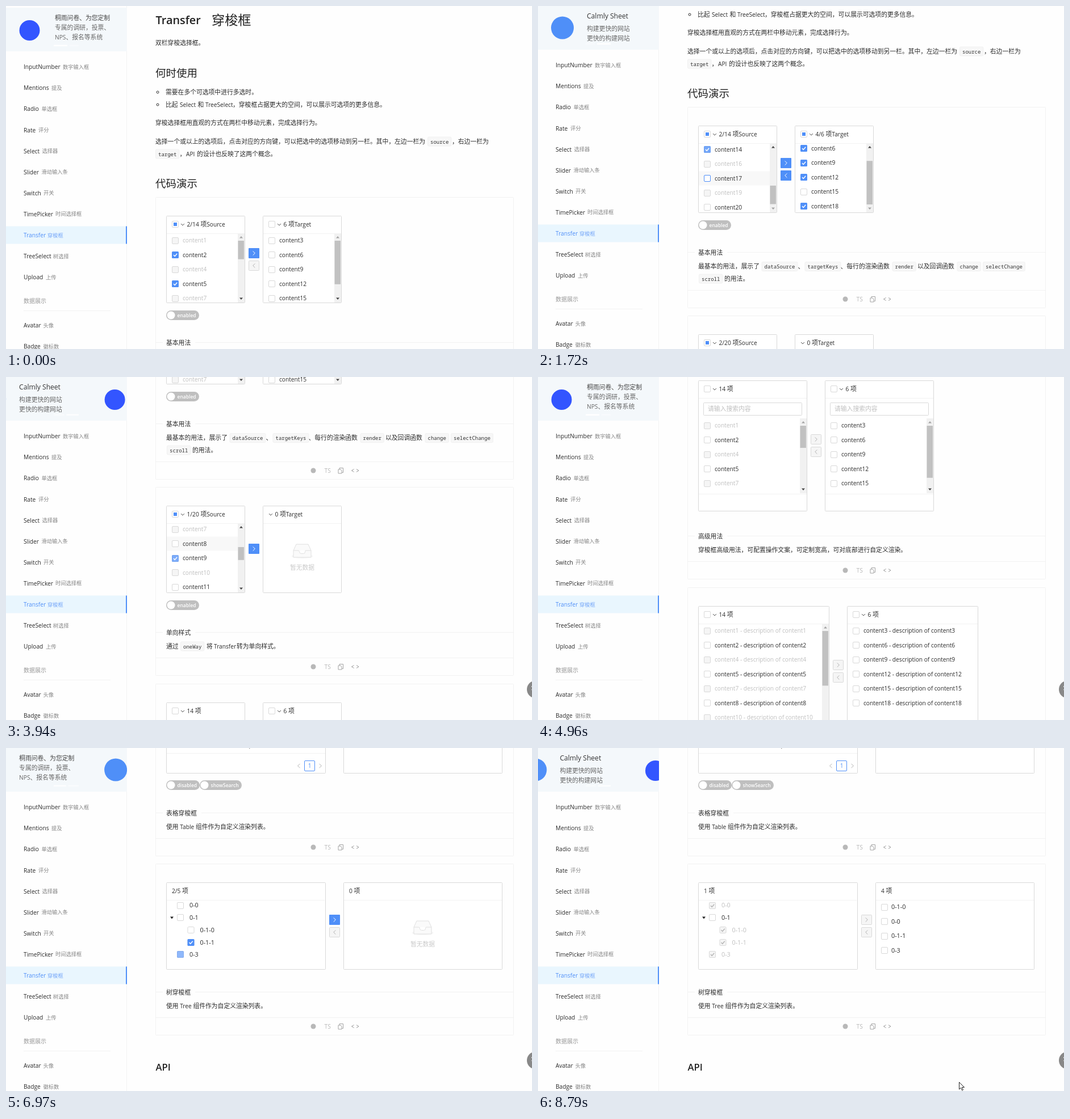
Write an HTML page that moves like this. It is 926 px wide and 605 px high and loops after 8890 ms.

```html
<!DOCTYPE html>
<html lang="zh-CN">
<head>
<meta charset="utf-8">
<title>Transfer</title>
<style>
html, body { margin: 0; width: 100%; height: 100%; overflow: hidden; background: #fefefe; }
svg { display: block; }
text { font-family: "Noto Sans CJK SC", "Noto Sans CJK", sans-serif; white-space: pre; }
.latin { font-family: "Open Sans", sans-serif; }
.code { font-family: "Noto Sans Mono", monospace; }
</style>
</head>
<body>
<svg id="stage" width="926" height="605" viewBox="0 0 926 605" xml:space="preserve"></svg>
<script>
const LOOP = 8890, STEP = 101;
const BLUE = '#4f8ff8', INK = '#2b2b2b', GREY = '#bfbfbf', EDGE = '#d9d9d9', LINE = '#f2f2f2';
const stage = document.getElementById('stage');
let t = 0;

// timing
const clamp = v => Math.max(0, Math.min(1, v));
const on = (from, to = LOOP, d = 120) => t < from || t >= to ? 0 : clamp((t - from) / d);
const held = to => t < to ? 1 : 0;
const within = (a, b) => t >= a && t < b;
function track(keys) {
  let i = keys.findIndex(k => k[0] > t);
  if (i === 0) return keys[0][1];
  if (i < 0) return keys[keys.length - 1][1];
  const [a, u] = keys[i - 1], [b, v] = keys[i], k = (t - a) / (b - a);
  return u + (v - u) * k * k * (3 - 2 * k);
}
// cubic-bezier(.25, .1, .25, 1)
function ease(x) {
  x = clamp(x);
  let lo = 0, hi = 1;
  for (let i = 0; i < 20; i++) {
    const s = (lo + hi) / 2;
    if (.75 * s * (1 - s) + s ** 3 < x) lo = s; else hi = s;
  }
  return .3 * lo * (1 - lo) ** 2 + 3 * lo * lo * (1 - lo) + lo ** 3;
}

// drawing
const rect = (x, y, w, h, fill, more = '') => `<rect x="${x}" y="${y}" width="${w}" height="${h}" fill="${fill}" ${more}/>`;
const frame = (x, y, w, h, color, fill = 'none', r = 1) => rect(x + .5, y + .5, w - 1, h - 1, fill, `stroke="${color}" rx="${r}"`);
const path = (d, color, w = 1, fill = 'none') => `<path d="${d}" stroke="${color}" stroke-width="${w}" fill="${fill}"/>`;
const circle = (x, y, r, fill, more = '') => `<circle cx="${x}" cy="${y}" r="${r}" fill="${fill}" ${more}/>`;
const hline = (x, y, w, c = LINE) => rect(x, y, w, 1, c);
const move = (x, y, s) => `<g transform="translate(${x},${y})">${s}</g>`;
const clip = (x, y, w, h, s) => `<svg x="${x}" y="${y}" width="${w}" height="${h}">${s}</svg>`;

function text(x, y, s, c = INK, z = 10.8, w = 400) {
  const runs = s.replace(/[^\u2e80-\uffff]+/g, m => `<tspan class="latin" font-size="${z * .945}">${m}</tspan>`);
  return `<text x="${x}" y="${y + z * .35}" fill="${c}" font-size="${z}" font-weight="${w}">${runs}</text>`;
}
const texts = (y, ...runs) => runs.map(([x, s]) => text(x, y, s)).join('');
function code(x, y, s) {
  return frame(x, y - 8.5, 5.4 * s.length + 10, 17, '#f1f1f1', '#f7f7f7', 2) +
    `<text class="code" x="${x + 5}" y="${y + 3.5}" font-size="9" fill="#333">${s}</text>`;
}
const codes = (y, ...runs) => runs.map(([x, s]) => code(x, y, s)).join('');
const tick = c => path('M-3 0l2.2 2.4 4-4.7', c, 1.5);

function box(x, y, amt = 0, o = {}) {
  let s = frame(-6, -6, 12, 12, o.hot ? BLUE : EDGE, o.off ? '#f5f5f5' : '#fff', 1.5);
  if (amt && o.off) s += tick('#b5b5b5');
  else if (amt) s += rect(-6, -6, 12, 12, BLUE, `rx="1.5" opacity="${.35 + .65 * amt}"`) + (amt > .5 ? tick('#fff') : '');
  if (o.part) s += rect(-3, -3, 6, 6, BLUE);
  return move(x, Math.round(y), s);
}
function button(x, y, dir, amt) {
  const d = `M${-1.8 * dir} -3.6l${3.6 * dir} 3.6 ${-3.6 * dir} 3.6`;
  return move(x, y, frame(-9.5, -9, 19, 18, EDGE, '#f5f5f5') +
    (amt ? rect(-9.5, -9, 19, 18, BLUE, `rx="1" opacity="${.45 + .55 * amt}"`) : '') +
    path(d, amt ? '#fff' : '#b0b0b0'));
}
const buttons = (x, y, right, left) => button(x, y, 1, right) + button(x, y + 22, -1, left);
const toggle = (x, y, w, s) => rect(x, y - 8.5, w, 17, GREY, 'rx="8.5"') + circle(x + 8.5, y, 7, '#fff') +
  text(x + 19.5, y + .5, s, '#fff', 9, 600);
const pager = (x, y) => path(`M${x - 17} ${y - 3.5}l-4 3.5 4 3.5M${x + 17} ${y - 3.5}l4 3.5-4 3.5`, '#b5b5b5') +
  frame(x - 9.5, y - 9.5, 19, 19, BLUE, '#fff', 1.5) + text(x - 2.8, y, '1', BLUE);
const empty = (x, y) => move(x, y,
  `<ellipse cy="9" rx="19" ry="4" fill="#f6f6f6"/>` +
  path('M-15.5-1L-10.5-12H10.5L15.5-1V11H-15.5ZM-15.5-1H-7Q-5 -1-5 1.5T-2 4.5H2Q5 4.5 5 1.5T7-1H15.5', '#e0e0e0', 1, '#fafafa') +
  text(-21.6, 29.5, '暂无数据', '#cacaca'));

// list column of a transfer
function list(x, y, o) {
  const { rows, w = 139, h = 154, title = '', pad = 0, foot = 0, scroll = 0, pick = {}, boxed = true, label = k => 'content' + k } = o;
  const n = rows.length, count = rows.filter(k => pick[k]).length, cx = boxed ? 29 : 14;
  let s = frame(0, 0, w, h, EDGE, '#fff') + hline(1, 31, w - 2);
  if (boxed) s += box(16, 15, 0, { part: count });
  s += path(`M${cx - 3} 14l3 3 3-3`, '#555') + text(cx + 7.5, 15.5, (count ? count + '/' : '') + n + ' 项' + title);
  if (pad) s += frame(9, 39, w - 18, 23, EDGE, '#fff') + text(17, 50.5, '请输入搜索内容', GREY);
  const view = h - 32 - pad - foot, all = n * 25.5 - 2, bar = all > view;
  const body = rows.map((k, i) => {
    const ry = 12.5 + 25.5 * i - scroll, off = k % 3 === 1;
    if (ry < -14 || ry > view + 14) return '';
    return (o.hover === k ? rect(0, ry - 12.5, w - 14, 25, '#f8f8f8') : '') +
      (boxed ? box(15, ry, pick[k], { off, hot: o.hot === k }) : path(`M${w - 18} ${ry - 3}l6 6m0-6l-6 6`, '#999')) +
      text(boxed ? 28 : 10, ry, label(k), off ? GREY : INK);
  }).join('');
  s += clip(1, 31 + pad, w - 2, view, body + (bar ? move(w - 14, 0, scrollbar(view, all, scroll)) : ''));
  if (!n) s += empty(w / 2, 80);
  if (foot) s += hline(1, h - foot, w - 2);
  return move(x, y, s);
}
function scrollbar(view, all, pos) {
  const room = view - 27, len = room * view / all, k = pos / (all - view);
  return rect(0, 0, 13, view, '#f1f1f1') + rect(.5, 13 + (room - len) * k, 10.5, len, '#c1c1c1') +
    path('M3 8.5l3-3.5 3 3.5z', 'none', 0, pos > 0 ? '#444' : '#a3a3a3') +
    path(`M3 ${view - 8.5}l3 3.5 3-3.5z`, 'none', 0, k < .99 ? '#444' : '#a3a3a3');
}

// table column of a transfer
function table(x, y, w, rows, pick, hover, wide) {
  const count = rows.filter(k => pick[k]).length;
  let s = frame(0, 0, w, 308, EDGE, '#fff') + text(10, 15.5, (count ? count + '/' : '') + rows.length + ' 项') +
    hline(1, 31, w - 2) + rect(1, 32, w - 2, 29, '#fafafa') + hline(1, 61, w - 2) +
    box(16, 45, 0, { part: count }) + text(38, 46, 'Name', INK, 10.8, 600);
  if (wide) s += text(117, 46, 'Description', INK, 10.8, 600) + rect(110, 37, 1, 18, LINE);
  rows.forEach((k, i) => {
    const ry = Math.round(76.5 + 30.15 * i);
    const bg = pick[k] ? '#ebf7fe' : hover === k ? '#fafafa' : '';
    if (bg) s += rect(1, ry - 15, w - 2, 30, bg);
    s += hline(1, ry + 15, w - 2) + box(16, ry - 1, pick[k], { off: k % 4 === 1 }) + text(38, ry, 'content' + k);
    if (wide) s += text(117, ry, 'description of content' + k);
  });
  return move(x, y, s + pager(w - 28.5, Math.round(83 + 30.15 * rows.length) + .5));
}

// demo card; its description lines are drawn from the first text row
function demo(top, h, title, body, desc, lines = 1) {
  const up = 21.5 * (lines - 1), ty = h - 76 - up, end = 290 + title.length * 10.8, line = Math.floor(ty - 1);
  return move(0, top, frame(263, 0, 631, h, LINE, '#fefefe') + hline(263, line, 13) + hline(end, line, 893 - end) +
    text(282, ty, title) + move(0, h - 52 - up, desc) + hline(263, h - 32, 630) +
    circle(541, h - 16, 4.5, '#b8b8b8') + text(560.5, h - 15.5, 'TS', '#b8b8b8') +
    path(`M587 ${h - 18}v-2.5h6.5v8h-2M585 ${h - 18}h4l2 2v5h-6z`, '#a3a3a3') +
    path(`M612.5 ${h - 18.5}l-4 2.5 4 2.5M617 ${h - 18.5}l4 2.5-4 2.5`, '#999') + body);
}

const range = n => Array.from({ length: n }, (_, i) => i + 1);
const all = range(20), third = all.filter(k => k % 3 === 0), others = all.filter(k => k % 3);

function basic() {
  const sent = t >= 2000, back = t >= 2200, moved = [5, 14, 17], returned = [6, 9, 12, 18];
  const target = [...(sent ? moved : []), ...third].filter(k => !back || !returned.includes(k));
  const source = all.filter(k => !target.includes(k));
  const left = { 2: held(700), 5: held(2000), 14: on(1630, 2000), 17: on(1800, 2000) };
  const right = { 6: on(900, 2200), 9: on(1020, 2200), 12: on(1150, 2200), 18: on(1400, 2200), 5: on(2480) };
  const hoverL = within(1650, 1850) ? 17 : 0, hoverR = within(2500, 2750) ? 14 : 0;
  return list(282, 33, { rows: source, title: 'Source', pick: left, hover: hoverL, hot: hoverL,
      scroll: sent ? (back ? 0 : 155) : track([[1400, 0], [1600, 231]]) }) +
    list(452, 33, { rows: target, title: 'Target', pick: right, hover: hoverR, hot: hoverR,
      scroll: sent ? 0 : track([[1180, 0], [1360, 29]]) }) +
    buttons(436.5, 99, held(2000), on(900, 2200, 250) || on(2480, LOOP, 250)) + toggle(282, 208.5, 58, 'enabled');
}
function oneWay() {
  const sent = t >= 4250, pick = { 2: held(3500), 5: held(3860), 9: on(3860, 4250) };
  return list(282, 33, { rows: sent ? all.filter(k => k !== 9) : all, title: 'Source', pick,
      hover: within(3850, 4050) ? 8 : 0, scroll: track([[3540, 0], [3760, 155]]) }) +
    list(452, 33, { rows: sent ? [9] : [], title: 'Target', boxed: false }) +
    button(436.5, 109, 1, held(4250)) + toggle(282, 208.5, 58, 'enabled');
}
const plain = (w, h, o) => list(282, 33, { rows: others, w, h, ...o }) +
  list(282 + w + 31, 33, { rows: third, w, h, ...o }) + buttons(282 + w + 15.5, 22 + Math.floor(h / 2), 0, 0);
function tables() {
  const sent = t >= 6050, back = t >= 6250;
  const target = [...(sent ? [2] : []), ...(back ? [] : [3]), 6, 9];
  const source = range(10).filter(k => !target.includes(k));
  return table(282, 33, 281, source, { 2: on(5830, 6050) }, within(5850, 6050) ? 4 : 0, true) +
    table(594, 33, 280, target, { 3: on(5650, 6250) }, 0, false) +
    buttons(578.5, 176, on(5830, 6050, 250), on(5650, 6250, 250)) +
    toggle(282, 361.5, 59, 'disabled') + toggle(341, 361.5, 74, 'showSearch');
}
function tree() {
  const nodes = [['0-0', 0, 7700, 8000], ['0-1', 0], ['0-1-0', 1, 7500, 8000], ['0-1-1', 1, 6790, 7170], ['0-3', 0, 6910, 7170]];
  const sent = [...(t >= 8000 ? ['0-1-0', '0-0'] : []), ...(t >= 7170 ? ['0-1-1', '0-3'] : [])];
  const checked = n => n[2] ? on(n[2], n[3]) : 0;
  const count = nodes.filter(checked).length;
  const head = (n, c) => text(10, 15.5, (c ? c + '/' : '') + n + ' 项') + hline(1, 31, 278);
  const left = nodes.map((node, i) => {
    const [name, depth] = node, y = 40.5 + 21.7 * i, x = 25 + 18.5 * depth, off = sent.includes(name);
    return box(x, y, off ? 1 : checked(node), { off }) + text(x + 16, y, name, off ? GREY : INK, 11.4);
  }).join('') + path('M7 60.5h6l-3 4z', 'none', 0, '#222');
  const right = sent.map((name, i) => box(16, 43.5 + 25.5 * i) + text(28, 43.5 + 25.5 * i, name, INK, 11.4)).join('');
  return move(282, 33, frame(0, 0, 281, 154, EDGE, '#fff') + head(5 - sent.length, count) + left) +
    move(594, 33, frame(0, 0, 280, 154, EDGE, '#fff') + head(sent.length, 0) + (right || empty(139.5, 80))) +
    buttons(578.5, 99, on(6750, 7170, 200) || on(7500, 8000, 250), 0);
}

function page() {
  return text(263.5, 25, 'Transfer', '#222', 21, 600) + text(362, 25, '穿梭框', '#222', 23.2) +
    text(263, 65, '双栏穿梭选择框。') + text(263, 119, '何时使用', '#222', 18.5) +
    circle(267, 152, 2, 'none', 'stroke="#333"') + circle(267, 174, 2, 'none', 'stroke="#333"') +
    text(281, 152, '需要在多个可选项中进行多选时。') +
    texts(174, [281, '比起'], [306, 'Select'], [337.5, '和'], [351, 'TreeSelect'], [399, '，穿梭框占据更大的空间，可以展示可选项的更多信息。']) +
    text(263, 206, '穿梭选择框用直观的方式在两栏中移动元素，完成选择行为。') +
    texts(239, [263, '选择一个或以上的选项后，点击对应的方向键，可以把选中的选项移动到另一栏。其中，左边一栏为'], [785, '，右边一栏为']) +
    code(742, 239, 'source') + code(263, 261, 'target') +
    texts(261, [305.5, '，'], [317, 'API'], [336, '的设计也反映了这两个概念。']) +
    text(263, 314, '代码演示', '#222', 18.5) +
    demo(337, 355, '基本用法', basic(),
      texts(0, [282, '最基本的用法，展示了'], [457.5, '、'], [532.5, '、每行的渲染函数'], [668, '以及回调函数']) +
      codes(0, [393.5, 'dataSource'], [469.5, 'targetKeys'], [623.5, 'render'], [737.5, 'change'], [783, 'selectChange']) +
      code(283, 21.5, 'scroll') + text(328, 21.5, '的用法。'), 2) +
    demo(705, 333, '单向样式', oneWay(),
      texts(0, [282, '通过'], [353, '将'], [366, 'Transfer'], [406, '转为单向样式。']) + code(307, 0, 'oneWay')) +
    demo(1052, 307, '带搜索框', plain(139, 154, { pad: 36 }), text(282, 0, '带搜索框的穿梭框，可以自定义搜索函数。')) +
    demo(1373, 384, '高级用法', plain(192, 231, { pad: 36, foot: 31 }), text(282, 0, '穿梭框高级用法，可配置操作文案，可定制宽高，可对底部进行自定义渲染。')) +
    demo(1771, 384, '自定义渲染行数据', plain(231, 231, { label: k => `content${k} - description of content${k}` }), text(282, 0, '自定义渲染每一个 Transfer Item，可用于渲染复杂数据。')) +
    demo(2169, 333, '分页', plain(139, 154, { foot: 31 }) + toggle(282, 208.5, 58, 'enabled'), text(282, 0, '大数据下使用分页。')) +
    demo(2515, 487, '表格穿梭框', tables(), text(282, 0, '使用 Table 组件作为自定义渲染列表。')) +
    demo(3015, 303, '树穿梭框', tree(), text(282, 0, '使用 Tree 组件作为自定义渲染列表。')) +
    text(263.5, 3374, 'API', '#222', 17.6, 600);
}

const menu = [['InputNumber', 100, '数字输入框'], ['Mentions', 80, '提及'], ['Radio', 62.5, '单选框'], ['Rate', 57, '评分'],
  ['Select', 63.5, '选择器'], ['Slider', 62.5, '滑动输入条'], ['Switch', 66, '开关'], ['TimePicker', 87, '时间选择框'],
  ['Transfer', 73, '穿梭框'], ['TreeSelect', 83, '树选择'], ['Upload', 70, '上传']];
const entry = (y, [name, x, note], c = INK, c2 = '#858585') => text(31, y, name, c) + text(x, y, note, c2, 9.25);

function banner() {
  const pos = ease((t - 803) / 500) + ease((t - 3833) / 500) + ease((t - 6863) / 500) + ease((t - 8706) / 500);
  const i = Math.floor(pos), k = pos - i, m = i % 2 ? 1 - k : k;
  const slides = [
    circle(41.5, 40, 18, '#3355ff') + text(86, 18.5, '桐雨问卷、为您定制', '#444', 10.8, 500) +
      text(86, 35.5, '专属的调研，投票、', '#666') + text(86, 52.5, 'NPS、报名等系统', '#666'),
    circle(43, 38.5, 20, BLUE) + text(86, 17.5, 'Calmly Sheet', '#333', 12.8) +
      text(86, 40.5, '构建更快的网站', '#666') + text(86, 57.5, '更快的构建网站', '#666')];
  const dot = (x, w, o) => rect(x, 65.5, w, 2.5, '#fff', `opacity="${o}"`);
  return clip(0, 0, 213, 77, rect(0, 0, 213, 77, '#f4f8fb') +
    move(-213 * k, 0, slides[i % 2]) + move(213 - 213 * k, 0, slides[(i + 1) % 2]) +
    dot(84, 24 - 8 * m, 1 - .7 * m) + dot(112 - 8 * m, 16 + 8 * m, .3 + .7 * m));
}
function sidebar() {
  return rect(212, -3, 1, 620, LINE) + banner() + rect(0, 385.5, 213, 31, '#e9f6fe') + rect(211, 385.5, 2, 31, BLUE) +
    menu.map((e, i) => entry(104.5 + 37.1 * i, e, ...(e[0] === 'Transfer' ? [BLUE, '#74a6f8'] : []))).join('') +
    text(31, 517, '数据展示', '#999', 10) + hline(31, 534, 153) +
    entry(560.5, ['Avatar', 65.5, '头像']) + entry(597.5, ['Badge', 65.5, '徽标数']);
}

function draw() {
  const scroll = Math.round(track([[540, 0], [1100, 159], [2040, 159], [2240, 136], [2740, 136], [3000, 270], [3100, 270],
    [3440, 511], [4440, 511], [4900, 1400], [5160, 1400], [5600, 2388], [6440, 2388], [6740, 2811]]));
  let s = rect(0, 0, 926, 605, '#fefefe') + move(0, -scroll, page()) + move(0, 3 - Math.min(3, scroll), sidebar());
  if (scroll > 400) s += circle(932.5, 551, 15.5, '#888') + path('M925 546h14M925.5 552l6-5', '#fff', 1.5);
  if (t >= 8790) s += path('M741.5 589.5v12.5l3-2.7 2 4.5 2-.9-2-4.4h4z', '#222', 1, '#fff');
  stage.innerHTML = s;
}

const start = performance.now();
let shown = -1;
function update() {
  const now = Math.max(0, performance.now() - start) % LOOP;
  t = now < 600 ? 0 : now >= 8790 ? 8790 : Math.min(8300, 600 + STEP * Math.floor((now - 600) / STEP));
  if (t !== shown) { shown = t; draw(); }
  requestAnimationFrame(update);
}
update();
</script>
</body>
</html>
```
